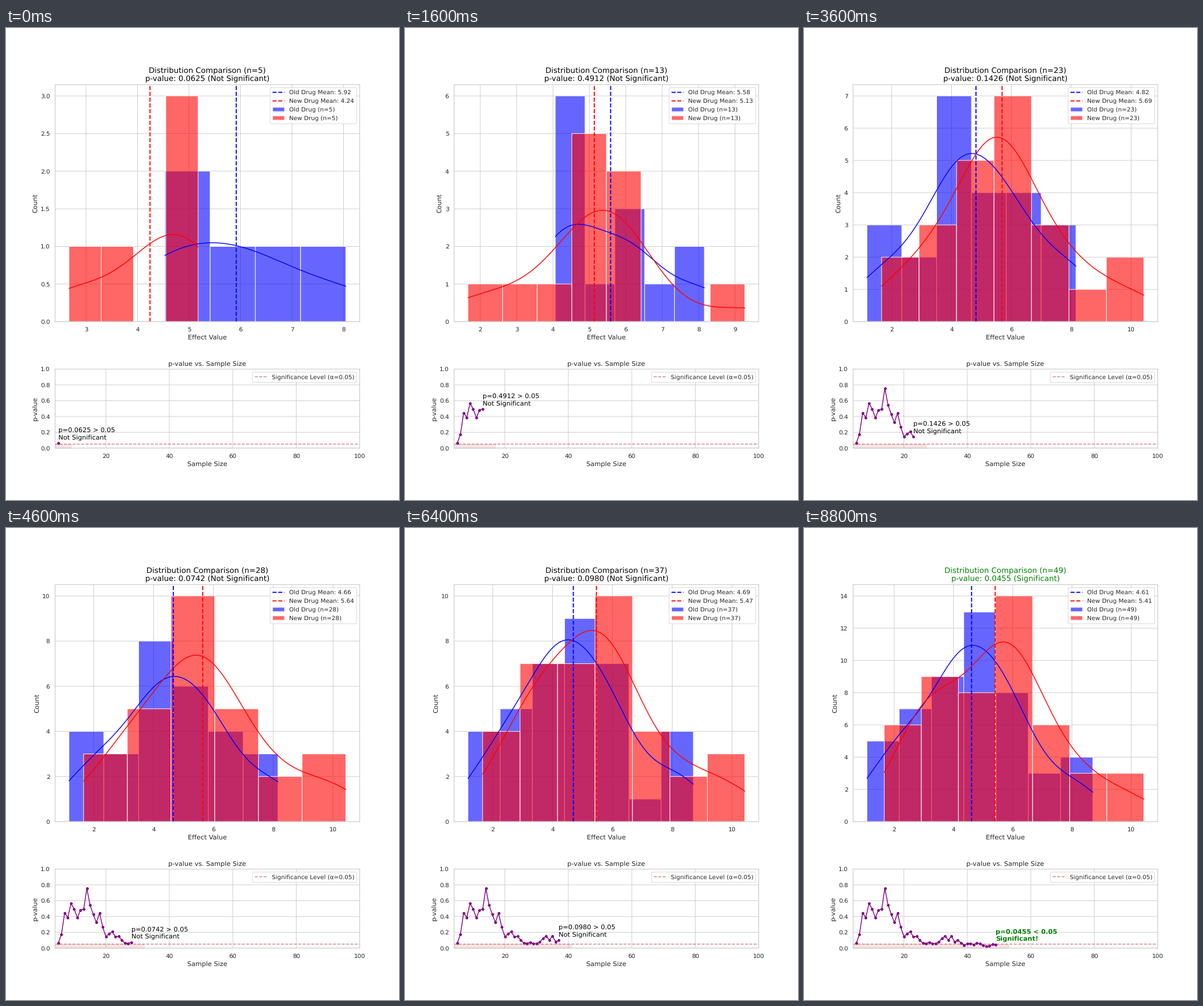
A matplotlib script that plays this animation: 683x820 px, repeating every 9 s.

```python
import math

import matplotlib.pyplot as plt
import numpy as np
from matplotlib.animation import FuncAnimation

DPI = 68.333
N_MIN, N_MAX, N_LAST = 5, 100, 49
ALPHA = 0.05
MUTED_RED = "#C44E52"

plt.rcParams.update({
    "font.family": "DejaVu Sans",
    "font.size": 12,
    "axes.labelsize": 12,
    "axes.titlesize": 12,
    "xtick.labelsize": 11,
    "ytick.labelsize": 11,
    "legend.fontsize": 11,
    "text.color": ".15",
    "text.hinting": "no_hinting",
    "path.snap": False,
    "axes.labelcolor": ".15",
    "xtick.color": ".15",
    "ytick.color": ".15",
    "axes.edgecolor": ".8",
    "axes.linewidth": 1.25,
    "axes.grid": True,
    "axes.axisbelow": True,
    "grid.color": ".8",
    "grid.linewidth": 1,
    "lines.linewidth": 1.5,
    "lines.solid_capstyle": "round",
    "patch.linewidth": 1,
    "patch.edgecolor": "w",
    "patch.force_edgecolor": True,
    "xtick.bottom": False,
    "ytick.left": False,
    "xtick.major.size": 6,
    "ytick.major.size": 6,
})

np.random.seed(42)
old_drug = np.random.normal(5, 2, N_MAX)
new_drug = np.random.normal(5.5, 2, N_MAX)


def t_test(a, b):
    """Two-sided p-value of the pooled t-test for two samples of equal size."""
    n = len(a)
    spread = math.sqrt((a.var(ddof=1) + b.var(ddof=1)) / n)
    theta = math.atan(abs(a.mean() - b.mean()) / spread / math.sqrt(2 * n - 2))
    # Closed form of the t distribution for an even number of degrees of freedom
    term = total = 1.0
    for k in range(1, n - 1):
        term *= (2 * k - 1) / (2 * k) * math.cos(theta) ** 2
        total += term
    return 1 - math.sin(theta) * total


def kde(data, grid):
    width = data.std(ddof=1) * len(data) ** -0.2
    z = (grid[:, None] - data) / width
    return np.exp(-z * z / 2).mean(axis=1) / (width * math.sqrt(2 * math.pi))


def hist_with_kde(ax, data, color, label):
    edges = np.histogram_bin_edges(data, "auto")
    counts, _ = np.histogram(data, edges)
    ax.bar(edges[:-1], counts, np.diff(edges), align="edge",
           facecolor=(color, 0.6), edgecolor="w", label=label)
    grid = np.linspace(data.min(), data.max(), 200)
    ax.plot(grid, kde(data, grid) * len(data) * (edges[1] - edges[0]), color=color)


sizes = np.arange(N_MIN, N_LAST + 1)
p_values = [t_test(old_drug[:n], new_drug[:n]) for n in sizes]

fig, (top, bottom) = plt.subplots(
    2, 1, figsize=((683 + 1e-6) / DPI, (820 + 1e-6) / DPI), dpi=DPI,
    gridspec_kw={"height_ratios": [3, 1], "hspace": 0.3})
fig.subplots_adjust(left=0.125, right=0.9, bottom=0.11, top=0.88)


def draw_distributions(n, p):
    groups = (("Old Drug", old_drug[:n], "blue"), ("New Drug", new_drug[:n], "red"))
    top.clear()
    for name, data, color in groups:
        hist_with_kde(top, data, color, f"{name} (n={n})")
    for name, data, color in groups:
        top.axvline(data.mean(), color=color, linestyle="--", linewidth=2,
                    label=f"{name} Mean: {data.mean():.2f}")
    significant = p < ALPHA
    verdict = "Significant" if significant else "Not Significant"
    top.set_title(f"Distribution Comparison (n={n})\np-value: {p:.4f} ({verdict})",
                  fontsize=14, color="green" if significant else "black")
    top.set_xlabel("Effect Value")
    top.set_ylabel("Count")
    top.legend(loc="upper right")


def draw_p_values(i, n, p):
    bottom.clear()
    bottom.axhline(ALPHA, color=MUTED_RED, linestyle="--", alpha=0.7,
                   label=f"Significance Level (α={ALPHA})")
    bottom.fill_between([N_MIN - 1, n + 4], 0, ALPHA, color=MUTED_RED, alpha=0.15)
    bottom.plot(sizes[:i + 1], p_values[:i + 1], "o-", color="purple", markersize=4)
    if p < ALPHA:
        note, style = f"p={p:.4f} < {ALPHA}\nSignificant!", {"color": "green", "weight": "bold"}
    else:
        note, style = f"p={p:.4f} > {ALPHA}\nNot Significant", {"color": "black"}
    bottom.text(n, p + 0.05, note, fontsize=12, **style)
    bottom.set_xlim(N_MIN - 1, N_MAX)
    bottom.set_ylim(0, 1)
    bottom.set_title("p-value vs. Sample Size")
    bottom.set_xlabel("Sample Size")
    bottom.set_ylabel("p-value")
    bottom.legend(loc="upper right")


def update(i):
    n, p = int(sizes[i]), p_values[i]
    draw_distributions(n, p)
    draw_p_values(i, n, p)
    return []


anim = FuncAnimation(fig, update, frames=len(sizes), interval=200, repeat=True,
                     repeat_delay=0, blit=False)

plt.show()
```
